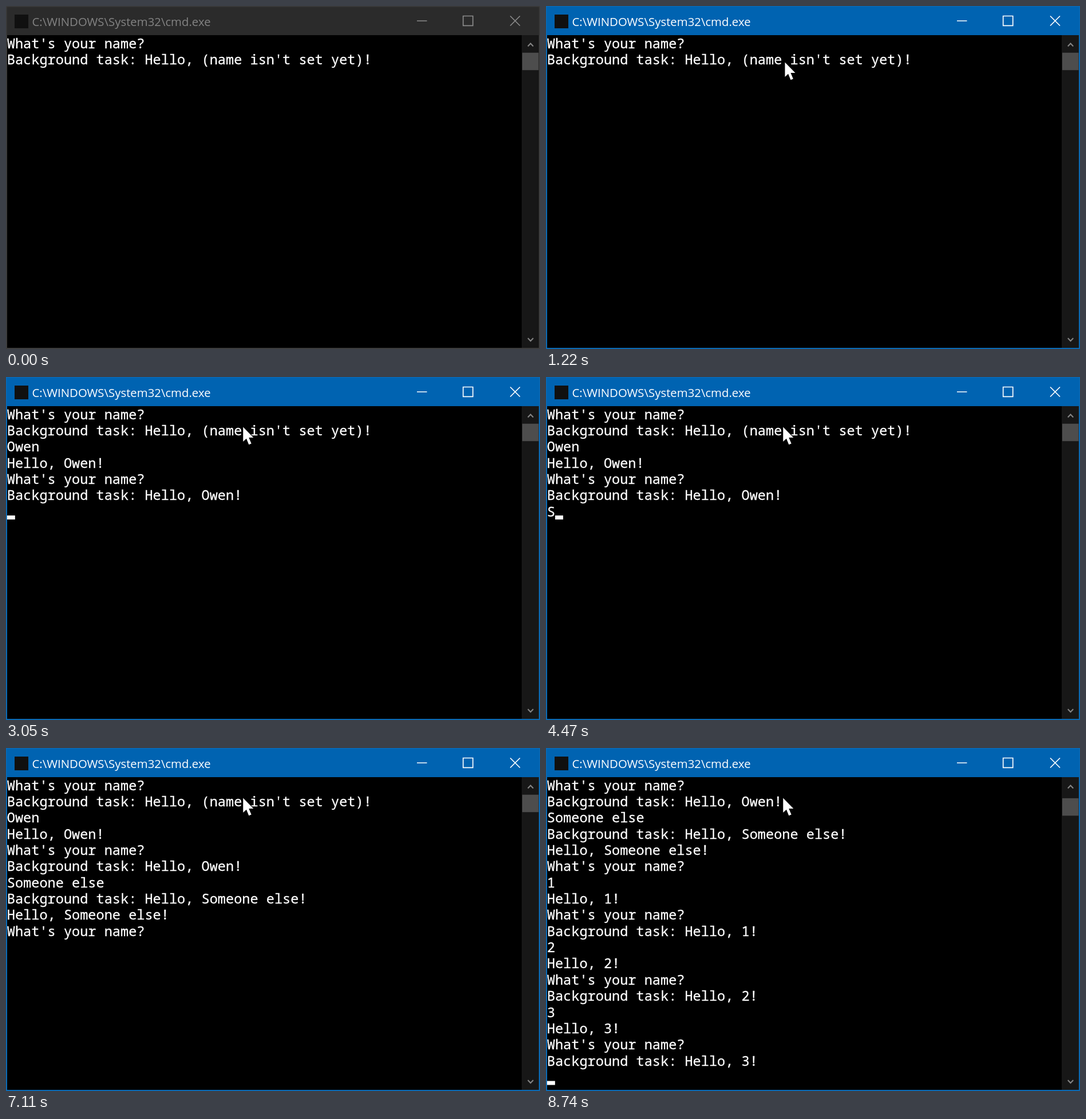
Recreate the animation shown at these times as an HTML page. Size 933 by 600 pixels, loop 9.76 s.

```html
<!DOCTYPE html>
<html lang="en">
<head>
<meta charset="utf-8">
<title>Console greeting</title>
<style>
  html, body { margin: 0; width: 100%; height: 100%; overflow: hidden; background: #000; }
  svg { display: block; width: 100vw; height: 100vh; }
  #title { font: 20.35px "Open Sans", "Noto Sans", sans-serif; }
  #screen {
    font: 23.6px "Noto Sans Mono", "DejaVu Sans Mono", monospace;
    fill: #fff; stroke: #fff; stroke-width: .3;
  }
  .line { fill: none; }
</style>
</head>
<body>
<svg viewBox="0 0 933 600">
  <rect id="frame" width="933" height="600"/>
  <rect id="bar" x="1.5" y="1.5" width="930" height="50"/>
  <rect x="15" y="15" width="24" height="24" fill="#101010"/>
  <text id="title" x="45.5" y="35">C:\WINDOWS\System32\cmd.exe</text>
  <path id="buttons" class="line" stroke-width="1.7"
    d="M718 26H735.5M798.7 17.5H815.7V34.3H798.7ZM881 17.5L898 34.5M898 17.5L881 34.5"/>
  <rect x="2" y="51" width="929" height="547"/>
  <rect x="901" y="51" width="30" height="547" fill="#171717"/>
  <rect id="thumb" x="902" width="28.5" height="30.5" fill="#4d4d4d"/>
  <path class="line" stroke="#868686" stroke-width="2"
    d="M911.8 70.5L916.5 65.5L921.2 70.5M911.8 581L916.5 586L921.2 581"/>
  <g id="screen"></g>
  <rect id="caret" width="14" height="7" fill="#fff"/>
  <path id="mouse" fill="#fff" stroke="#000" stroke-width="2" paint-order="stroke"
    d="M0 0V25.5L5.7 20.2L10 30.8L14.4 29L10 18.6H18Z"/>
</svg>
<script>
// The screen refreshes TICKS times per loop; all times below are in ticks.
const LOOP = 9760, TICKS = 48;
const CELL = 14.17, ROW = 28.35, TOP = 51, LEFT = 1.8, ROWS = 19;
const ARRIVE = 5, FOCUS = 6, READY = 8, IDLE = 4;

const $ = id => document.getElementById(id);
const set = (el, attrs) => {
  for (const key in attrs) el.setAttribute(key, attrs[key]);
};

const ask = "What's your name?";
const hello = who => `Hello, ${who}!`;
const task = who => `Background task: ${hello(who)}`;

// Typing begins at start, Enter is pressed at enter, the replies appear at done.
const answer = (who, start, enter = start, done = enter, taskFirst = false) => {
  const greet = [hello(who), ask];
  const replies = taskFirst ? [task(who), ...greet] : [...greet, task(who)];
  return { who, start, enter, done, replies };
};
const answers = [
  answer("Owen", 11, 14, 15),
  answer("Someone else", 22, 30, 31, true),
  answer("1", 37),
  answer("2", 39),
  answer("3", 42, 43)
];

const rows = Array.from({ length: ROWS }, (_, i) => {
  const row = document.createElementNS("http://www.w3.org/2000/svg", "text");
  set(row, { x: LEFT, y: TOP + i * ROW + 22.6 });
  return $("screen").appendChild(row);
});

function typedPart({ who, start, enter }, tick) {
  const p = (tick - start) / (enter - start);
  return who.slice(0, Math.round(1 + (who.length - 1) * p ** 1.5));
}

function consoleAt(tick) {
  const lines = [ask, task("(name isn't set yet)")];
  let input = "", lastActive = READY;
  for (const a of answers) {
    if (tick < a.start) break;
    lastActive = Math.min(tick, a.done);
    if (tick < a.enter) {
      input = typedPart(a, tick);
      break;
    }
    lines.push(a.who);
    if (tick >= a.done) lines.push(...a.replies);
  }
  const finished = tick >= answers.at(-1).done;
  const caret = tick >= READY && (finished || tick - lastActive < IDLE);
  return { lines, input, caret };
}

function drawWindow(active) {
  set($("frame"), { fill: active ? "#0a6ab5" : "#3c3c3c" });
  set($("bar"), { fill: active ? "#0063b1" : "#2b2b2b" });
  set($("title"), { fill: active ? "#fff" : "#838383" });
  set($("buttons"), { stroke: active ? "#fff" : "#8a8a8a" });
}

function drawConsole({ lines, input, caret }) {
  const scroll = Math.max(0, lines.length - ROWS + 1);
  const view = [...lines, input].slice(scroll);
  rows.forEach((row, i) => {
    const text = view[i] || "";
    if (row.textContent !== text) row.textContent = text;
  });
  set($("caret"), {
    x: LEFT + input.length * CELL,
    y: TOP + view.length * ROW - 7.2,
    visibility: caret ? "visible" : "hidden"
  });
  set($("thumb"), { y: 81.7 + scroll * 1.55 });
}

function drawMouse(tick) {
  const rest = (1 - Math.min(1, tick / ARRIVE)) ** 2;
  const nudge = tick >= READY ? 1 : 0;
  const x = 417.5 + 340 * rest - 3.2 * nudge;
  const y = 98.5 + 510 * rest - 11 * nudge;
  set($("mouse"), { transform: `translate(${x} ${y})` });
}

function render(ms) {
  // the small lead absorbs rounding of the refresh times
  const tick = Math.min(TICKS - 1, Math.floor((ms + 8) * TICKS / LOOP));
  drawWindow(tick >= FOCUS);
  drawConsole(consoleAt(tick));
  drawMouse(tick);
}

const start = performance.now();
function loop() {
  render((performance.now() - start) % LOOP);
  requestAnimationFrame(loop);
}
loop();
</script>
</body>
</html>
```
